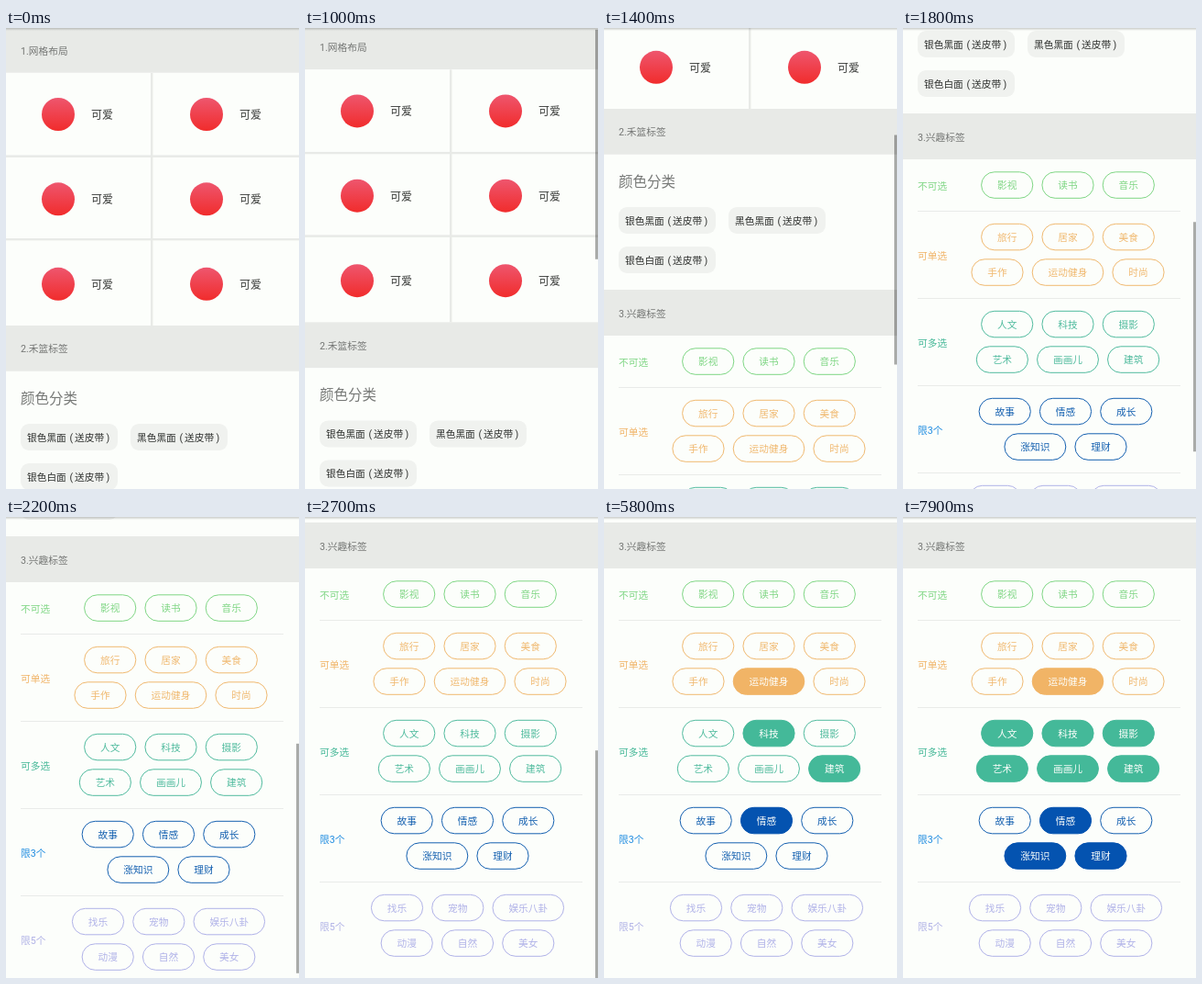
Animation of 320x502 px, one loop 8000 ms. Source, as an HTML page:

```html
<!DOCTYPE html>
<html lang="zh-CN">
<head>
<meta charset="utf-8">
<title>标签布局</title>
<style>
html, body { margin: 0; width: 100%; height: 100%; overflow: hidden; background: #fcfefb; }
svg { display: block; width: 100%; height: 100%; }
text { font-family: Roboto, "Noto Sans CJK SC", "Noto Sans CJK", sans-serif; font-size: 10.7px; }
</style>
</head>
<body>
<svg id="stage" viewBox="0 0 320 502" preserveAspectRatio="none">
  <defs>
    <linearGradient id="red" x1="0" y1="0" x2="0" y2="1">
      <stop offset="0" stop-color="#ee566e"/>
      <stop offset="1" stop-color="#f12c2c"/>
    </linearGradient>
    <linearGradient id="shade" x1="0" y1="0" x2="0" y2="1">
      <stop offset="0" stop-color="#000" stop-opacity=".2"/>
      <stop offset="1" stop-color="#000" stop-opacity="0"/>
    </linearGradient>
  </defs>
  <g id="page"></g>
  <rect width="320" height="3" fill="url(#shade)"/>
  <rect id="bar" x="317" width="3" height="250" fill="#000" opacity="0"/>
</svg>
<script>
(() => {
  const LOOP = 8000, VIEW = 502, CONTENT = 1017;
  const GREY = '#e8eae7', PAPER = '#fcfefb';
  const page = document.getElementById('page');
  const bar = document.getElementById('bar');

  function add(tag, attrs) {
    const el = document.createElementNS('http://www.w3.org/2000/svg', tag);
    for (const k in attrs) el.setAttribute(k, attrs[k]);
    return page.appendChild(el);
  }

  const rect = (x, y, width, height, fill, rx = 0) => add('rect', { x, y, width, height, fill, rx });

  // y is the vertical middle of the glyphs
  function label(str, x, y, fill, size = 10.7, anchor = 'start') {
    const el = add('text', { x, y: y + size * 0.375, fill, 'text-anchor': anchor });
    el.style.fontSize = size + 'px';
    el.textContent = str;
    return el;
  }

  function header(str, y, h) {
    rect(0, y, 320, h, GREY);
    label(str, 16, y + h / 2 + 0.5, '#747674');
  }

  function grid() {
    [94, 186.3, 278.8].forEach(cy => {
      for (const x of [0, 162]) {
        add('circle', { cx: x + 57, cy, r: 18, fill: 'url(#red)' });
        label('可爱', x + 93, cy + 0.5, '#3c3e3c', 12);
      }
    });
    rect(0, 138.5, 320, 2.4, GREY);
    rect(0, 229, 320, 2.4, GREY);
    rect(158, 49, 2.4, 275, GREY);
  }

  function chip(str, x, y) {
    rect(x, y, 106, 29, '#f0f2ef', 9);
    const mid = y + 15;
    [[str, 7], ['(', 53.5], ['送皮带', 59], [')', 93.5]]
      .forEach(([s, dx]) => label(s, x + dx, mid, '#2e302e'));
  }

  const pills = {};

  function pillRow(names, cx, y, color, fill, weight) {
    const widths = names.map(n => n.length * 10.7 + 35.8), gap = 9.1;
    let x = cx - (widths.reduce((a, b) => a + b) + gap * (names.length - 1)) / 2;
    names.forEach((name, i) => {
      const w = widths[i];
      const box = add('rect', { x: x + 0.5, y: y + 0.5, width: w - 1, height: 28.5, rx: 14.25, stroke: color, fill: 'none' });
      const text = label(name, x + w / 2, y + 15, color, 10.7, 'middle');
      text.style.fontWeight = weight;
      pills[name] = on => {
        box.setAttribute('fill', on ? fill : 'none');
        box.setAttribute('stroke', on ? fill : color);
        text.setAttribute('fill', on ? PAPER : color);
      };
      x += w + gap;
    });
  }

  // title, title colour, outline, filled colour, centre, weight, rows
  const groups = [
    ['不可选', '#7fd684', '#7fd684', '#7fd684', 180, 400, ['影视 读书 音乐']],
    ['可单选', '#f0b468', '#f0b970', '#f1b466', 180, 400, ['旅行 居家 美食', '手作 运动健身 时尚']],
    ['可多选', '#46b898', '#50bb9e', '#44b999', 180, 400, ['人文 科技 摄影', '艺术 画画儿 建筑']],
    ['限3个', '#1f8ce0', '#1460b0', '#0453b0', 177.5, 500, ['故事 情感 成长', '涨知识 理财']],
    ['限5个', '#b0b2e6', '#b0b2e8', '#b0b2e8', 177.5, 400, ['找乐 宠物 娱乐八卦', '动漫 自然 美女']]
  ];

  rect(0, 0, 320, CONTENT, PAPER);
  header('1.网格布局', 0, 48.7);
  grid();
  header('2.禾篮标签', 324, 49.7);
  label('颜色分类', 16, 403, '#777977', 15.5);
  chip('银色黑面', 16, 431);
  chip('黑色黑面', 136, 431);
  chip('银色白面', 16, 474);
  header('3.兴趣标签', 521, 50);

  let groupY = 584.3;
  groups.forEach(([title, tint, color, fill, cx, weight, rows], i) => {
    rows.forEach((row, r) => pillRow(row.split(' '), cx, groupY + r * 38.5, color, fill, weight));
    const h = 29.5 + (rows.length - 1) * 38.5;
    label(title, 16, groupY + h / 2 + 0.7, tint);
    if (i < groups.length - 1) rect(16, groupY + h + 13.2, 287, 1, '#e9ebe9');
    groupY += h + 27;
  });

  const taps = [
    ['运动健身', 3900], ['科技', 4400], ['建筑', 4800], ['情感', 5500], ['理财', 5900],
    ['涨知识', 6400], ['艺术', 6800], ['人文', 7000], ['摄影', 7400], ['画画儿', 7800]
  ];

  // scroll offset per 100 ms tick, starting at 500 ms
  const drag = [0.3, 0.7, 1.2, 1.8, 2.6, 3.6, 24, 80, 158, 236, 302, 354, 396,
    428, 454, 474, 489, 500, 508, 513, 515];

  function draw(t) {
    const tick = Math.floor(t / 100);
    const y = tick < 5 ? 0 : drag[Math.min(tick - 5, drag.length - 1)];
    page.setAttribute('transform', `translate(0 ${-y})`);
    bar.setAttribute('y', y * VIEW / CONTENT);
    const show = tick < 6 ? 0 : Math.max(0, Math.min(1, (30 - tick) / 3));
    bar.setAttribute('opacity', 0.33 * show);
    taps.forEach(([name, at]) => pills[name](t >= at));
  }

  const start = performance.now();
  function frame() {
    draw((performance.now() - start) % LOOP);
    requestAnimationFrame(frame);
  }
  frame();
})();
</script>
</body>
</html>
```
